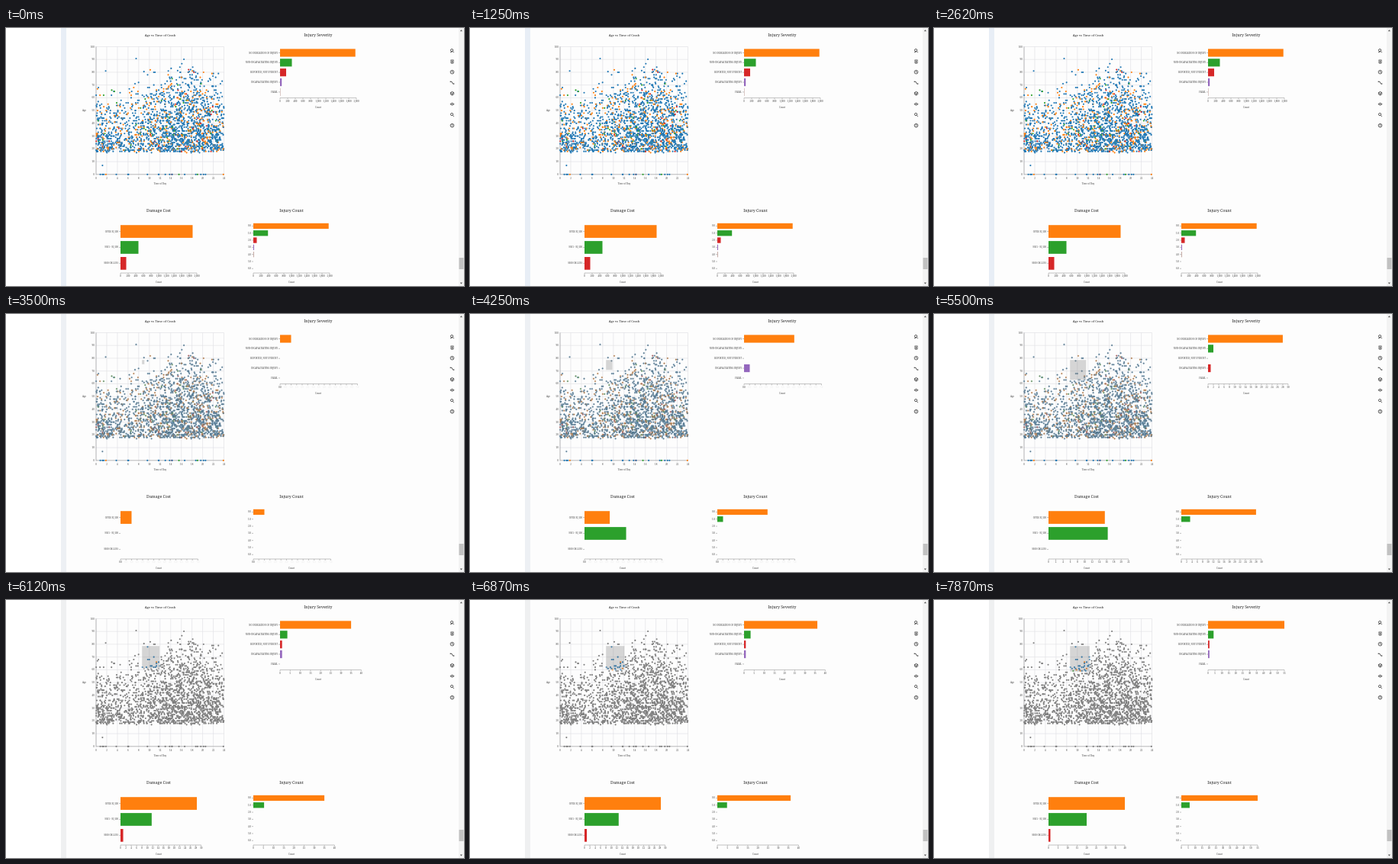
Recreate the animation shown at these times as an HTML page. Size 600x338 px, loop 8 s.

```html
<!DOCTYPE html>
<html lang="en">
<head>
<meta charset="utf-8">
<title>Crash dashboard</title>
<style>
html, body { margin: 0; width: 100%; height: 100%; overflow: hidden; background: #fff; }
svg { display: block; width: 100vw; height: 100vh; }
text { font-family: "Noto Serif", "Liberation Serif", serif; font-size: 2.9px; fill: #444; }
.title { font-size: 5.2px; fill: #222; }
.small { font-size: 4.1px; }
.axis { stroke: #999; stroke-width: .6; fill: none; }
.icon { stroke: #333; stroke-width: .8; fill: none; }
</style>
</head>
<body>
<svg id="stage" viewBox="0 0 600 338"></svg>
<script>
const stage = document.getElementById("stage");
const LOOP = 8000;
const GREY = "#7f7f7f", BLUE = "#1f77b4";
const RANKS = ["#ff7f0e", "#2ca02c", "#d62728", "#9467bd", "#8c564b", "#e377c2", GREY];

function set(node, attrs) {
  for (const k in attrs) node.setAttribute(k, attrs[k]);
  return node;
}
function el(name, attrs, parent = stage) {
  return parent.appendChild(set(document.createElementNS("http://www.w3.org/2000/svg", name), attrs));
}
const rect = (x, y, width, height, fill) => el("rect", { x, y, width, height, fill });
function label(text, x, y, anchor = "middle", cls = "", parent = stage) {
  const node = el("text", { x, y, "text-anchor": anchor, class: cls }, parent);
  node.textContent = text;
  return node;
}

// Page frame, scrollbar and toolbar
rect(79, 0, 514, 338, "#fdfdfd");
const gutter = rect(72, 0, 7, 338);
rect(593, 0, 7, 338, "#f3f3f3");
rect(593.5, 301, 6, 15, "#c1c1c1");
el("path", { d: "M594.8 4.3l1.6-2 1.6 2zM594.8 333.5l1.6 2 1.6-2z", fill: "#555" });
const ring = "M-2.3 0a2.3 2.3 0 1 0 4.6 0a2.3 2.3 0 1 0-4.6 0";
const lens = "M-2-.6a1.6 1.6 0 1 0 3.2 0a1.6 1.6 0 1 0-3.2 0M.8 .8l1.7 1.7";
[
  lens + "M-2.5 2.4q1-1.4 2.6-.6",
  "M-2-1.7h4M-1.5-1.4v3.8h3v-3.8M0-.5v2",
  ring + "M0-1.4v1.5l1 .6",
  "M-2.5-1.4h2l1.3 2.8h1.8M-2.4-2v1.2M2.3 .8v1.2",
  "M0-2.3l2.1 1.1v2.4l-2.1 1.1-2.1-1.1v-2.4zM-2-1.1l2 1.1 2-1.1M0 0v2.2",
  "M-2.6 0q2.6-3 5.2 0q-2.6 3-5.2 0M-.7 0h1.4",
  lens,
  ring + "M-.8-.6q.8-1.3 1.5 0q0 .5-.7 1M0 1.1v.6"
].forEach((d, i) => el("path", { d, class: "icon", transform: `translate(584.5 ${29.7 + i * 14})` }));

// Scatter plot
const hourX = h => 118 + h * 6.98;
const ageY = a => 191.8 - a * 1.673;
label("Age vs Time of Crash", 202, 11.4, "middle", "title small");
label("Age", 102.5, 109);
label("Time of Day", 202, 205);
const grid = el("g", { stroke: "#dedee2", "stroke-width": .6 });
for (let h = 0; h <= 24; h += 2) {
  el("path", { d: `M${hourX(h)} 24.5V193.5` }, grid);
  label(h, hourX(h), 197.6);
}
for (let a = 0; a <= 100; a += 10) {
  el("path", { d: `M116.5 ${ageY(a)}H285.5` }, grid);
  label(a, 115.8, ageY(a) + 1, "end");
}
el("path", { d: "M118 24.5V191.8H285.5", class: "axis", stroke: "#bbb" });

let seed = 77;
function rnd() {
  seed = (seed * 1664525 + 1013904223) % 4294967296;
  return seed / 4294967296;
}
const bell = (x, mid, width) => Math.exp(-(((x - mid) / width) ** 2));
const dayTraffic = h => bell(h, 17, 8);
const traffic = h => .35 + 1.05 * dayTraffic(h) + .5 * bell(h, 0, 2.4);

function dotColour() {
  const r = rnd();
  return r < .77 ? BLUE : r < .95 ? RANKS[0] : r < .985 ? RANKS[1] : RANKS[2];
}
const dots = [];
function addDot(h, age, colour = dotColour()) {
  const cx = hourX(h), cy = ageY(age);
  dots.push({ cx, cy, age, colour, node: el("circle", { cx, cy }) });
}
while (dots.length < 2000) {
  const h = rnd() * 24;
  if (rnd() * 1.4 > traffic(h)) continue;
  // Ages thin out steadily towards the oldest drivers
  const fall = Math.pow(1 - Math.sqrt(rnd()), 1.25 - .25 * dayTraffic(h));
  addDot(h, Math.round(17 + 2 * rnd() + (54 + 16 * dayTraffic(h)) * fall));
}
for (let i = 0; i < 22; i++) addDot(24 * rnd(), 0);
for (let i = 0; i < 8; i++) addDot(7 + 12 * rnd(), 78 + 13 * rnd());
addDot(1.2, 7, BLUE);
addDot(1.8, 81, BLUE);

const brush = set(rect(178, 60, 0, 0, "#777"), { "fill-opacity": .3, stroke: "#fff", "stroke-width": .4 });

// Round tick spacing: 1, 2 or 5 times a power of ten
function tickStep(domain) {
  const raw = domain / 11.5, base = 10 ** Math.floor(Math.log10(raw)), r = raw / base;
  return base * (r > 7.07 ? 10 : r > 3.16 ? 5 : r > 1.41 ? 2 : 1);
}

// Bar charts
function barChart({ title, titleY, x, y, h, step, axisY, names }) {
  label(title, x + 50, titleY, "middle", "title");
  label("Count", x + 50, axisY + 13.2);
  const bars = names.map((name, i) => {
    const top = y + i * step, mid = top + h / 2;
    label(name, x - 3, mid + 1, "end");
    el("path", { d: `M${x - 2} ${mid}h2`, class: "axis" });
    return rect(x, top, 0, h);
  });
  const axis = el("g", {});
  return (widths, counts, domain, labels) => {
    const whole = bars.map((_, i) => Math.round(counts[i] || 0));
    const order = [...whole.keys()].sort((a, b) => whole[b] - whole[a]);
    order.forEach((id, rank) => set(bars[id], { width: widths[id], fill: RANKS[rank] }));

    axis.replaceChildren();
    const tick = tickStep(domain);
    let end = 100;
    for (let v = 0; v <= domain * 1.065; v += tick) {
      const dx = v / domain * 100;
      end = Math.max(end, dx);
      el("path", { d: `M${x + dx} ${axisY}v1.8`, class: "axis" }, axis);
      const text = tick < 1 ? v.toFixed(1) : v.toLocaleString("en-US");
      set(label(text, x + dx, axisY + 5.2, "middle", "", axis), { opacity: v ? labels : 1 });
    }
    el("path", { d: `M${x} ${axisY}h${end}`, class: "axis" }, axis);
  };
}
const charts = [
  barChart({
    title: "Injury Severity", titleY: 11.3, x: 359, y: 27.4, h: 10.2, step: 12.85, axisY: 91.6,
    names: ["NO INDICATION OF INJURY", "NON-INCAPACITATING INJURY", "REPORTED, NOT EVIDENT", "INCAPACITATING INJURY", "FATAL"]
  }),
  barChart({
    title: "Damage Cost", titleY: 240.6, x: 150, y: 258.2, h: 16.7, step: 20.9, axisY: 321,
    names: ["OVER $1,500", "$501 - $1,500", "$500 OR LESS"]
  }),
  barChart({
    title: "Injury Count", titleY: 240.6, x: 324, y: 255.8, h: 7.3, step: 9.3, axisY: 321,
    names: Array.from({ length: 7 }, (_, i) => i.toFixed(1))
  })
];

// Crash counts per chart; "people" is the axis range of both injury charts
function state(at, brush, people, cost, counts, labels = 1) {
  const domains = [people, cost, people];
  const widths = counts.map((list, c) => list.map(n => n / domains[c] * 100));
  return { at, brush, domains, counts, widths, labels };
}
const everyone = [[1974, 310, 160, 44, 6], [1890, 470, 150], [1974, 384, 90, 20, 10]];
const states = [
  state(0, [0, 0], 2000, 2000, everyone),
  state(2620, [0, 0], 2000, 2000, everyone),
  state(3500, [3.5, 6], 6.9, 6.9, [[1], [1], [1]], .1),
  state(4750, [12.5, 18.5], 8, 6.6, [[8, 0, 0, 1], [3, 6], [8, 1]]),
  state(5500, [21.5, 26.5], 28.6, 21, [[28, 2, 0, 1], [15.5, 16.3], [28, 3.3]]),
  state(6120, [23.5, 29.5], 37.6, 28.4, [[35, 3.6, 1, 1], [28.4, 11.6, 1], [35, 5.3]]),
  state(7870, [26, 34], 55, 40, [[55, 4, 1, 1], [40, 20, 1], [55, 6]])
];

// The screen refreshes four times a second while something moves
const run = (from, n) => Array.from({ length: n }, (_, i) => from + i * 250);
const beats = [0, 2620, ...run(3000, 5), ...run(4250, 6), ...run(5870, 5), ...run(7000, 2), ...run(7620, 2)];

function paintDots(mode, w, h) {
  for (const { cx, cy, age, colour, node } of dots) {
    const inside = cx >= 178 && cx <= 178 + w && cy >= 60 && cy <= 60 + h;
    const lit = mode === 0 || (mode === 1 ? age === 0 : inside);
    const halo = mode === 1 && !lit;
    set(node, {
      fill: lit ? colour : GREY,
      r: halo ? .9 : 1.08,
      stroke: halo ? colour : "none",
      "stroke-width": .3
    });
  }
}

function draw(t) {
  const i = states.findLastIndex(s => s.at <= t);
  const a = states[i], b = states[i + 1] || a;
  const p = a === b ? 0 : (t - a.at) / (b.at - a.at);
  const mix = (u = 0, v = 0) => u + (v - u) * p;

  const [width, height] = a.brush.map((v, k) => mix(v, b.brush[k]));
  set(brush, { width, height });
  const mode = t < 3000 ? 0 : t < 5870 ? 1 : 2;
  paintDots(mode, width, height);
  set(gutter, { fill: ["#e8eef6", "#edf0f4", "#eff0f1"][mode] });

  const near = p > .6 ? b : a;
  charts.forEach((update, c) => {
    const widths = everyone[c].map((_, k) => mix(a.widths[c][k], b.widths[c][k]));
    update([...widths, 0, 0], near.counts[c], near.domains[c], near.labels);
  });
}

let shown = -1;
function frame(now) {
  const t = now % LOOP;
  const beat = beats.findLast(v => v <= t);
  if (beat !== shown) draw(shown = beat);
  requestAnimationFrame(frame);
}
frame(performance.now());
</script>
</body>
</html>
```
